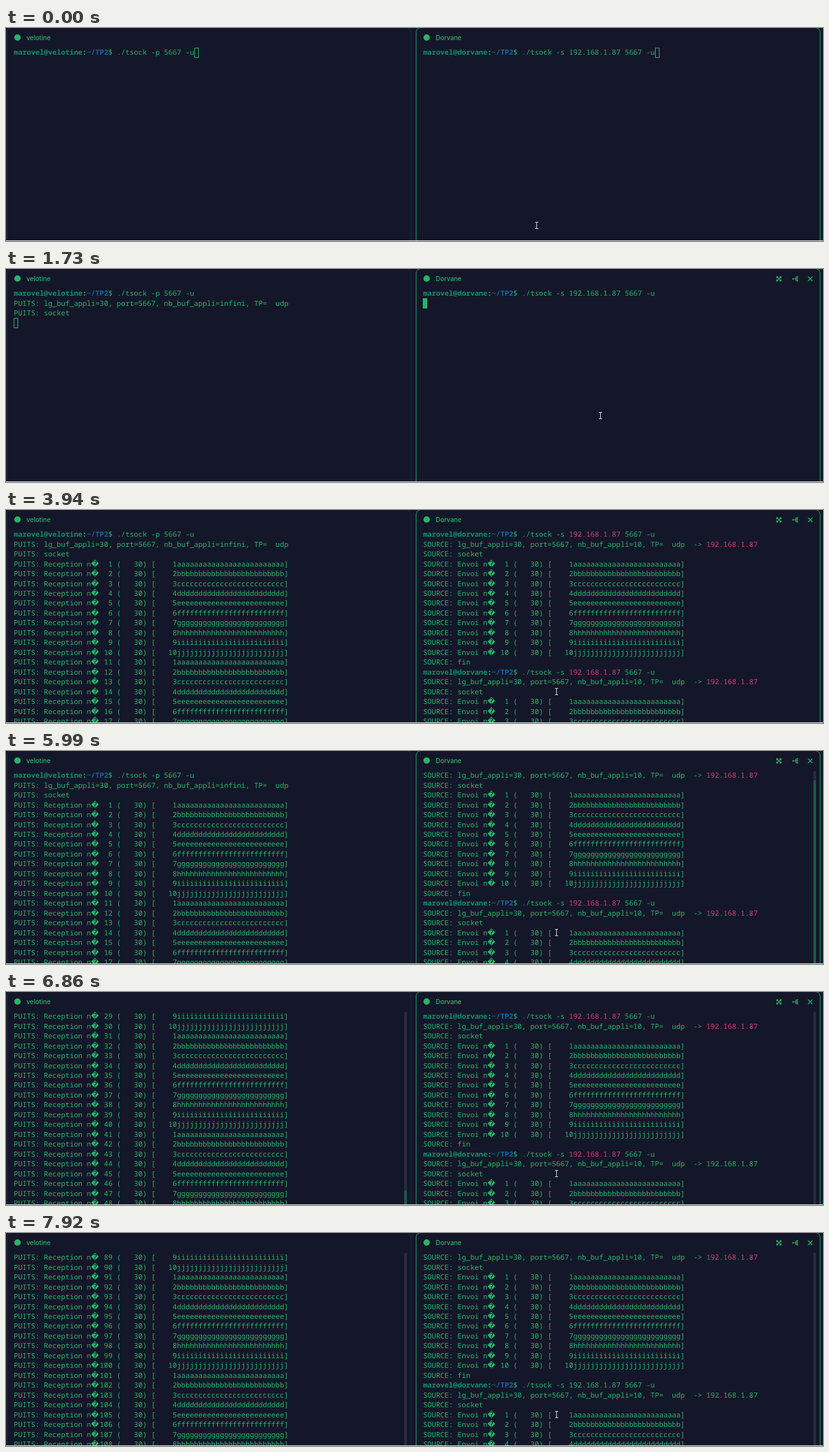
An HTML page that plays this animation: 1280x335 px, repeating every 8 s.

```html
<!DOCTYPE html>
<html lang="fr">
<head>
<meta charset="utf-8">
<title>Terminals</title>
<style>
  html, body { margin: 0; width: 100%; height: 100%; overflow: hidden; background: #141729; }
  #stage { position: relative; width: 1280px; height: 335px; overflow: hidden; color: #27b568; }
  .pane { position: absolute; top: -1px; width: 632px; height: 700px; border: 1px solid #222a3a; border-radius: 8px; }
  .pane.lit { border-color: #1f9f66; }
  .logo { position: absolute; left: 11px; top: 10px; width: 10px; height: 10px; border-radius: 50%; background: #27b568; }
  .title { position: absolute; left: 30px; top: 8px; font: 500 10px/14px Inter, sans-serif; }
  .tools { position: absolute; left: 563px; top: 8.5px; fill: none; stroke: #27b568; stroke-width: 1.2; visibility: hidden; }
  .pane.tooled .tools { visibility: visible; }
  pre { position: absolute; left: 10.3px; top: 31.2px; margin: 0; white-space: pre;
    font: 11.217px/15.47px "Noto Sans Mono", monospace; text-rendering: geometricPrecision; font-variant-ligatures: none; }
  pre div { height: 15.47px; }
  b { font-weight: 700; }
  .user { color: #119068; }
  .path { color: #1368a8; }
  .hot { color: #d83f7c; }
  .bad { display: inline-block; width: 6.73px; height: 15px; font: 12px/15px "DejaVu Sans", sans-serif; vertical-align: top; }
  .cursor { position: absolute; box-sizing: border-box; width: 7px; height: 16px; border: 1px solid #27b568; }
  .cursor.full { background: #27b568; }
  .track { position: absolute; left: 622px; top: 31px; width: 4px; height: 670px; border-radius: 2px; background: #282d40; overflow: hidden; }
  .thumb { position: absolute; width: 4px; height: 670px; background: #1b5b49; }
  #mouse { position: absolute; left: -4px; top: -7px; fill: none; stroke: #d5d7dd; }
  #edge { position: absolute; left: 0; top: 334px; width: 1280px; height: 1px; background: #dfe1e6; }
</style>
</head>
<body>
<div id="stage"></div>
<script>
const LOOP = 8000, CELL = 6.73, ROW = 15.47, LAST_ROW = 42, SHOWN = 20, RUN = 14;
const IP = '192.168.1.87';
const stage = document.getElementById('stage');

function makePane(x, title) {
  const el = document.createElement('div');
  el.className = 'pane';
  el.style.left = x + 'px';
  el.innerHTML = `<i class="logo"></i><span class="title">${title}</span>
    <svg class="tools" width="60" height="14">
      <path d="M1.500 3l7 7M8.500 3l-7 7M1.500 5.500V3H4M6 3h2.500v2.500M8.500 7.500V10H6M4 10H1.500V7.500"/>
      <path d="M27 6.500h7M31.500 3.500v6M31.500 3.500H34M31.500 9.500H34"/>
      <path stroke-width="2" d="M26 6.500h2M33 3.500h2M33 6.500h2M33 9.500h2"/>
      <path d="M50.500 3l7 7M57.500 3l-7 7"/>
    </svg><pre></pre><i class="cursor"></i><i class="track"><i class="thumb"></i></i>`;
  stage.append(el);
  const find = name => el.querySelector(name);
  return { el, text: find('pre'), cursor: find('.cursor'), track: find('.track'), thumb: find('.thumb') };
}

const left = makePane(1, 'velotine');
const right = makePane(642.2, 'Dorvane');
stage.insertAdjacentHTML('beforeend',
  '<svg id="mouse" width="9" height="13"><path d="M2 1.500h5M4.500 2v9M2 11.500h5"/></svg><div id="edge"></div>');
const mouse = document.getElementById('mouse');

// Each step changes part of the state.
const done = (n, more) => ({ sent: n, recv: n, typed: false, entered: false, hot: n, ...more });
const enter = { typed: true, entered: true };
const steps = [
  [0, { focus: '', lit: 'right', tools: '', stage: 0, sent: 0, recv: 0, typed: true, entered: false, hot: 0, lag: false }],
  [510, { focus: 'left', lit: 'left', tools: 'left' }],
  [580, { stage: 1 }],
  [650, { stage: 2 }],
  [1510, { focus: 'right', lit: 'right', tools: 'right' }],
  [1730, enter],
  [1800, done(1, { hot: 0 })],
  [1870, { hot: 1 }],
  [3610, { typed: true }],
  [3820, done(2, { hot: 1 })],
  [3940, { hot: 2 }],
  [4800, done(3)],
  [5990, enter],
  [6060, done(4)],
  [6390, enter],
  [6460, done(5)],
  [6650, done(6)],
  [6790, { ...enter, lag: true }],
  [6860, done(7)],
  [7000, enter], [7060, done(8)],
  [7130, enter], [7200, done(9)],
  [7330, done(10)],
  [7450, enter], [7520, done(11)],
  [7650, enter], [7720, done(12)],
  [7810, enter], [7860, done(13)],
  [7920, enter]
];

// start, end, from, to, number of jumps
const moves = [
  [70, 430, [831, 311], [430, 205], 6],
  [1110, 1510, [430, 205], [931, 231], 7],
  [2330, 2530, [931, 231], [862, 286], 4]
];

const prompt = host => `<b class="user">marovel@${host}</b><b>:</b><b class="path">~/TP2</b>$ `;
const address = hot => hot ? `<span class="hot">${IP}</span>` : IP;
const packet = (label, n) => {
  const k = (n - 1) % 10;
  return `${label} n<span class="bad">\ufffd</span>${String(n).padStart(4)} (   30) [`
    + String(k + 1).padStart(5) + 'abcdefghij'[k].repeat(25) + ']';
};

function leftLine(i, s) {
  if (i === 0) return prompt('velotine') + './tsock -p 5667 -u';
  if (s.stage < 2) return '';
  if (i === 1) return 'PUITS: lg_buf_appli=30, port=5667, nb_buf_appli=infini, TP=  udp';
  if (i === 2) return 'PUITS: socket';
  return i - 2 <= s.recv * 10 ? packet('PUITS: Reception', i - 2) : '';
}

function rightLine(i, s, top) {
  const run = Math.floor(i / RUN), k = i % RUN, first = Math.floor(top / RUN);
  let hotPrompt = run < s.hot, hotSource = hotPrompt;
  if (s.lag) {
    hotPrompt = !s.entered || run === first;
    hotSource = (s.entered || s.sent === 7) && run === first;
  }
  if (run > s.sent || (run === s.sent && k > 0)) return '';
  if (k === 0) {
    const typed = run < s.sent || s.typed;
    return prompt('dorvane') + (typed ? `./tsock -s ${address(hotPrompt)} 5667 -u` : '');
  }
  if (k === 1) return `SOURCE: lg_buf_appli=30, port=5667, nb_buf_appli=10, TP=  udp  -&gt; ${address(hotSource)}`;
  if (k === 2) return 'SOURCE: socket';
  return k === 13 ? 'SOURCE: fin' : packet('SOURCE: Envoi', k - 2);
}

function drawPane(pane, name, line, s, row, col) {
  const top = Math.max(0, row - LAST_ROW);
  pane.el.classList.toggle('lit', s.lit === name);
  pane.el.classList.toggle('tooled', s.tools === name);
  pane.text.innerHTML = Array.from({ length: SHOWN }, (_, i) => `<div>${line(top + i, s, top)}</div>`).join('');
  pane.cursor.classList.toggle('full', s.focus === name);
  pane.cursor.style.left = 10.3 + col * CELL + 'px';
  pane.cursor.style.top = Math.floor(31 + (row - top) * ROW) + 'px';
  pane.track.style.display = top ? 'block' : 'none';
  pane.thumb.style.top = 670 * top / (LAST_ROW + 1 + top) + 'px';
}

function mouseAt(t) {
  let at = moves[0][2];
  for (const [start, end, from, to, jumps] of moves) {
    if (t < start) break;
    const p = Math.min(1, (Math.floor((t - start) / (end - start) * (jumps - 1) + 0.01) + 1) / jumps);
    const eased = p * p * (3 - 2 * p);
    at = from.map((v, i) => Math.round(v + (to[i] - v) * eased));
  }
  return at;
}

let shown = -1;
function render(t) {
  const [x, y] = mouseAt(t);
  mouse.style.transform = `translate(${x}px, ${y}px)`;
  const count = steps.filter(([time]) => time <= t).length;
  if (count === shown) return;
  shown = count;
  const s = Object.assign({}, ...steps.slice(0, count).map(step => step[1]));
  drawPane(left, 'left', leftLine, s, [0, 1, 3 + s.recv * 10][s.stage], s.stage ? 0 : 42);
  drawPane(right, 'right', rightLine, s, s.sent * RUN + (s.entered ? 1 : 0), s.entered ? 0 : s.typed ? 54 : 23);
}

const begin = performance.now();
function tick() {
  render((performance.now() - begin) % LOOP);
  requestAnimationFrame(tick);
}
tick();
</script>
</body>
</html>
```
